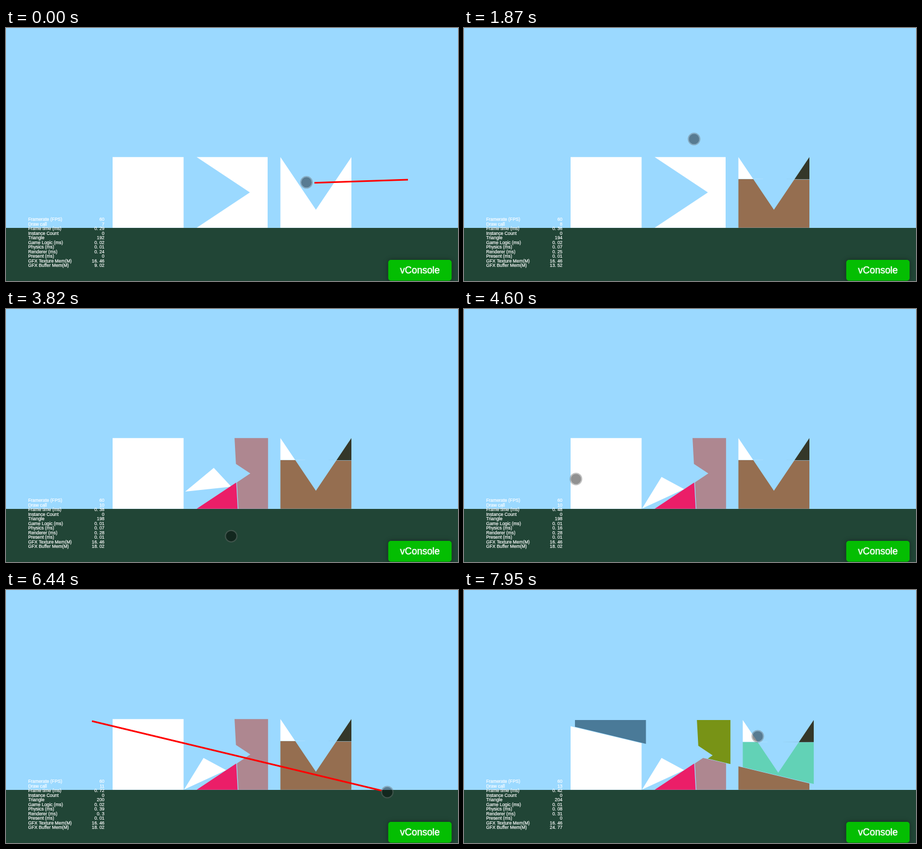
An HTML page with a canvas for the animation above (8000 ms loop, 831 by 467 pixels).

```html
<!DOCTYPE html>
<html lang="en">
<head>
<meta charset="utf-8">
<title>Slicing shapes</title>
<style>
html, body { margin: 0; width: 100%; height: 100%; overflow: hidden; background: #9bd9ff; }
canvas { display: block; }
</style>
</head>
<body>
<canvas id="stage" width="831" height="467"></canvas>
<script>
const ctx = document.getElementById('stage').getContext('2d');
const LOOP = 8000;
const FONT = '"Liberation Sans", Arial, sans-serif';
const SIDE = 130.5, TOP = 238.3, FLOOR = TOP + SIDE;
const SEAM = 0.25;

// A block is outlined in units of its own side length.
const block = (left, ...corners) =>
  corners.map(([u, v]) => [left + u * SIDE, TOP + v * SIDE]);
const square = block(196, [0, 0], [1, 0], [1, 1], [0, 1]);
const arrow = block(350.5, [0, 0], [1, 0], [1, 1], [0, 1], [0.75, 0.5]);
const crown = block(504.5, [0, 0], [0.5, 0.745], [1, 0], [1, 1], [0, 1]);

// Each cut is a stroke of the pointer, drawn from `begin` until `end`.
const flat = { begin: 0, end: 470, from: [739, 280], to: [470, 278.5] };
const steep = { begin: 2440, end: 2850, from: [416, 181], to: [430, 439] };
const long = { begin: 5600, end: 6700, from: [158, 242], to: [701, 372.5] };
const cuts = [flat, steep, long];

// Plain dividers that tell apart two loose pieces on the same side of a cut.
const crownMiddle = { from: [569.75, 0], to: [569.75, 467] };
const arrowMiddle = { from: [0, 303.5], to: [831, 303.5] };

// Key points of the pointer: time, x, y.
const pointerPath = [
  [-140, 662, 291], [0, 553, 285], [140, 478, 279], [900, 468, 279], [1870, 423, 205],
  [2400, 416, 181], [2840, 430, 430], [2980, 430, 421], [3500, 432, 436],
  [4480, 377, 385], [4600, 206, 314], [5000, 159, 243], [5570, 159, 243],
  [5870, 367, 285], [6440, 701, 373], [7600, 701, 373], [7950, 540, 270]
];

const progress = (t, from, to) => Math.min(1, Math.max(0, (t - from) / (to - from)));
const mix = (a, b, k) => a + (b - a) * k;
const random = seed => Math.abs(Math.sin(seed * 127.1 + 3.7) * 43758.5453) % 1;

function pointerAt(t) {
  const next = pointerPath.findIndex(key => key[0] > t);
  if (next < 0) return pointerPath[pointerPath.length - 1].slice(1);
  const [t0, x0, y0] = pointerPath[next - 1];
  const [t1, x1, y1] = pointerPath[next];
  const k = progress(t, t0, t1);
  return [mix(x0, x1, k), mix(y0, y1, k)];
}

// Keeps the part to the left (1) or right (-1) of the line's direction.
function clip(points, { from, to }, side) {
  const dx = to[0] - from[0], dy = to[1] - from[1], length = Math.hypot(dx, dy);
  const distance = ([x, y]) =>
    side * ((x - from[0]) * dy - (y - from[1]) * dx) / length - SEAM;
  return points.flatMap((a, i) => {
    const b = points[(i + 1) % points.length];
    const da = distance(a), db = distance(b);
    const kept = da >= 0 ? [a] : [];
    if (da >= 0 !== db >= 0) {
      const k = da / (da - db);
      kept.push([mix(a[0], b[0], k), mix(a[1], b[1], k)]);
    }
    return kept;
  });
}

function fill(color, points, dx = 0, dy = 0) {
  ctx.fillStyle = color;
  ctx.beginPath();
  points.forEach(([x, y]) => ctx.lineTo(x + dx, y + dy));
  ctx.fill();
}

// Draws a body whole, or as two pieces once the long cut has split it.
function drawSplit(t, points, color, upperColor, slide) {
  if (t < long.end) {
    fill(color, points);
    return;
  }
  fill(color, clip(points, long, -1));
  fill(upperColor, clip(points, long, 1), slide, slide * 0.21);
}

function drawFallingTip(t, points) {
  const swing = progress(t, 3400, 3980) ** 1.2;
  const drop = progress(t, 2960, 3980) ** 1.4;
  ctx.save();
  ctx.translate(397 - 31.7 * swing, 254.2 + 82.8 * drop);
  ctx.rotate(-58.5 * swing * Math.PI / 180);
  fill('#fff', points, -397, -254.2);
  ctx.restore();
}

function drawArrow(t, slide) {
  if (t < steep.end) {
    fill('#fff', arrow);
    return;
  }
  const left = clip(arrow, steep, -1);
  const nudge = 0.8 * progress(t, 3000, 3500);
  const right = clip(arrow, steep, 1).map(([x, y]) => [x + nudge, y]);
  drawFallingTip(t, clip(left, arrowMiddle, 1));
  fill('#eb1e68', clip(left, arrowMiddle, -1));
  drawSplit(t, right, '#ae8790', '#789316', slide);
}

function drawCrown(t, slide) {
  if (t < flat.end) {
    fill('#fff', crown);
    return;
  }
  const tips = clip(crown, flat, -1);
  fill('#fff', clip(tips, crownMiddle, -1), slide, slide * 0.21);
  fill('#343729', clip(tips, crownMiddle, 1), slide, slide * 0.21);
  drawSplit(t, clip(crown, flat, 1), '#956e50', '#62d2b6', slide);
}

function drawStroke(t) {
  const cut = cuts.find(({ begin, end }) => t >= begin && t < end);
  if (!cut) return;
  ctx.strokeStyle = '#f00';
  ctx.lineWidth = 3.2;
  ctx.beginPath();
  ctx.moveTo(...cut.from);
  ctx.lineTo(...pointerAt(t - 19));
  ctx.stroke();
}

function write(text, x, y, align, weight) {
  ctx.textAlign = align;
  ctx.fillStyle = ctx.strokeStyle = '#fff';
  ctx.lineWidth = weight;
  ctx.fillText(text, x, y);
  ctx.strokeText(text, x, y);
}

function drawStats(t) {
  // The load grows with every cut, landing and new stroke.
  const stage = [flat.end, steep.end, 3500, long.begin, long.end].filter(e => t >= e).length;
  const load = stage + (t >= long.end ? 1 : 0);
  const seed = Math.floor(t / 500);
  const logic = random(seed) < 0.5 ? 0.01 : 0.02;
  const physics = stage ? 0.07 + 0.5 * random(seed + 40) ** 4 : 0.01;
  const renderer = 0.24 + 0.014 * stage;
  const present = stage && random(seed + 80) < 0.7 ? 0.01 : 0;
  const rows = [
    ['Framerate (FPS)', 60],
    ['Draw call', 7 + load],
    ['Frame time (ms)', logic + physics + renderer + 0.02],
    ['Instance Count', 0],
    ['Triangle', 192 + 2 * load],
    ['Game Logic (ms)', logic],
    ['Physics (ms)', physics],
    ['Renderer (ms)', renderer],
    ['Present (ms)', present],
    ['GFX Texture Mem(M)', 16.46],
    ['GFX Buffer Mem(M)', 9.02 + 4.5 * Math.ceil(stage / 2) + 2.25 * (load - stage)]
  ];
  ctx.font = '8.35px ' + FONT;
  rows.forEach(([label, value], i) => {
    const y = 356 + i * 8.54;
    write(label, 40.7, y, 'left', 0.2);
    write(String(+value.toFixed(2)).replace('.', '. '), 181, y, 'right', 0.2);
  });
}

function drawButton() {
  ctx.save();
  ctx.shadowColor = 'rgba(0,0,0,0.4)';
  ctx.shadowBlur = 8;
  ctx.fillStyle = '#04be02';
  ctx.beginPath();
  ctx.roundRect(702.7, 428, 116.6, 38.5, 5);
  ctx.fill();
  ctx.restore();
  ctx.font = '17.5px ' + FONT;
  write('vConsole', 761, 453, 'center', 0.5);
}

function drawPointer(t) {
  const [x, y] = pointerAt(t);
  ctx.fillStyle = 'rgba(0,0,0,0.43)';
  ctx.beginPath();
  ctx.arc(x, y, 9.6, 0, Math.PI * 2);
  ctx.fill();
  ctx.strokeStyle = 'rgba(105,105,105,0.42)';
  ctx.lineWidth = 2;
  ctx.beginPath();
  ctx.arc(x, y, 10.6, 0, Math.PI * 2);
  ctx.stroke();
}

function draw(t) {
  const slide = 8 * Math.max(0, (t - 6750) / 1200) ** 2;
  ctx.fillStyle = '#9bd9ff';
  ctx.fillRect(0, 0, 831, 467);
  ctx.fillStyle = '#214536';
  ctx.fillRect(0, 369, 831, 98);
  drawSplit(t, square, '#fff', '#4a7a98', slide);
  drawArrow(t, slide);
  drawCrown(t, slide);
  drawStroke(t);
  drawStats(t);
  drawButton();
  drawPointer(t);
}

const start = performance.now();
function tick() {
  draw((performance.now() - start) % LOOP);
  requestAnimationFrame(tick);
}
tick();
</script>
</body>
</html>
```
